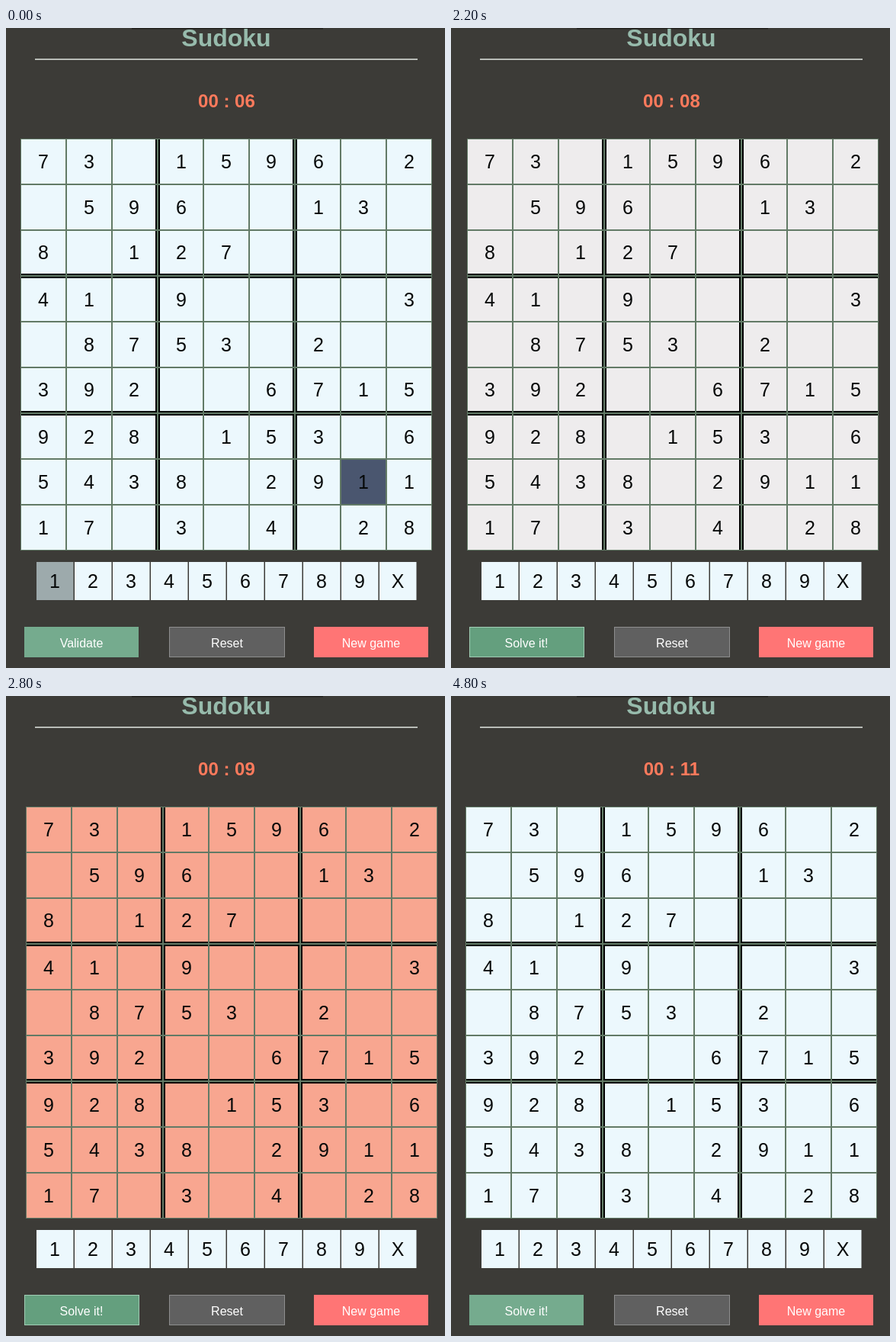
Write an HTML page that moves like this. It is 576 by 839 pixels and loops after 5.1 s.

```html
<!DOCTYPE html>
<html lang="en">
<head>
<meta charset="utf-8">
<title>Sudoku</title>
<style>
  html, body { margin: 0; width: 100%; height: 100%; overflow: hidden; background: #3c3b37; }
  svg { display: block; width: 576px; height: 839px; font-family: "Liberation Sans", Arial, sans-serif; }
  text { text-anchor: middle; }
  .digit { font-size: 25px; fill: #060808; }
  .label { font-size: 16px; fill: #fff; }
  .title { font-size: 32px; font-weight: bold; fill: #97bbac; }
  .timer { font-size: 24px; font-weight: bold; fill: #ff7a5c; }
</style>
</head>
<body>
<svg id="stage" viewBox="0 0 576 839"></svg>
<script>
const LOOP = 5100, STEP = 100;
const PALE = [236, 248, 253], CORAL = [255, 123, 87], GREY = [157, 170, 172];
const GREEN = [117, 171, 142], GREEN_HOVER = [100, 159, 126], GREEN_EDGE = [160, 204, 180];
const ROWS = ['73.1596.2', '.596..13.', '8.127....', '41.9....3', '.8753.2..',
              '392..6715', '928.153.6', '5438.2911', '17.3.4.28'];
const SHAKE_START = 2100;
const SHAKE = [-10, 2, -2, 2, -3, 4, -5, 7, -5, 3, 8, 0];

const stage = document.getElementById('stage');

function add(parent, tag, attrs, content) {
  const el = document.createElementNS('http://www.w3.org/2000/svg', tag);
  for (const name in attrs) el.setAttribute(name, attrs[name]);
  if (content) el.textContent = content;
  return parent.appendChild(el);
}
function rect(parent, x, y, width, height, fill) {
  return add(parent, 'rect', fill ? { x, y, width, height, fill } : { x, y, width, height });
}
function text(parent, cls, x, y, content) {
  return add(parent, 'text', { class: cls, x, y }, content);
}

const clamp = v => Math.min(1, Math.max(0, v));
const ramp = (t, from, to) => clamp((t - from) / (to - from));
const swing = p => 0.5 - Math.cos(p * Math.PI) / 2;
const mix = (a, b, p) => `rgb(${a.map((v, i) => Math.round(v + (b[i] - v) * p))})`;

// Header
rect(stage, 165, 0, 251, 1.4, '#20201d');
text(stage, 'title', 289, 24, 'Sudoku');
rect(stage, 38, 40.3, 502, 1.5, '#e2e6e2');
const timer = text(stage, 'timer', 289.4, 104, '00 : 06');

// Board: frame, dark block edges, cell faces, digits
const board = add(stage, 'g', {});
rect(board, 19, 145, 540, 540, '#627a66');
const edges = add(board, 'g', { fill: '#000' });
const faces = add(board, 'g', {});
const digits = add(board, 'g', {});
let picked;

function span(i) {
  const before = i % 3 === 0 && i > 0 ? 2 : 0;
  const after = i % 3 === 2 && i < 8 ? 2 : 0;
  return { pos: i * 60 + 1 + before, size: 58 - before - after };
}
ROWS.forEach((row, r) => [...row].forEach((ch, c) => {
  const h = span(c), v = span(r);
  const x = 19 + h.pos, y = 145 + v.pos;
  rect(edges, 20 + c * 60, 146 + r * 60, 58, 58);
  const face = rect(faces, x, y, h.size, v.size);
  if (r === 7 && c === 7) picked = face;
  if (ch !== '.') text(digits, 'digit', x + h.size / 2, y + v.size / 2 + 9, ch);
}));

// Keypad
const keys = [...'123456789X'].map((ch, i) => {
  const key = rect(stage, 40 + i * 50, 700, 48.5, 50, mix(PALE, PALE, 0));
  text(stage, 'digit', 64 + i * 50, 734, ch);
  return key;
});

// Buttons
function button(x, width, fill, edge, label) {
  const box = add(stage, 'rect', { x: x + 0.5, y: 785.5, width: width - 1, height: 39, fill, stroke: edge });
  return { box, label: text(stage, 'label', x + width / 2, 812, label) };
}
const check = button(24, 150, '#75ab8e', '#75ab8e', 'Validate');
button(214, 152, '#606060', '#8e8e8e', 'Reset');
button(404, 150, '#ff7575', '#ff7575', 'New game');

function draw(t) {
  const seconds = t < 900 ? 6 : 7 + Math.floor((t - 800) / 1000);
  timer.textContent = '00 : ' + String(seconds).padStart(2, '0');

  keys[0].setAttribute('fill', mix(GREY, PALE, swing(ramp(t, 200, 800))));

  const hover = swing(ramp(t, 800, 1300)) - swing(ramp(t, 3500, 4000));
  check.box.setAttribute('fill', mix(GREEN, GREEN_HOVER, hover));
  check.box.setAttribute('stroke', mix(GREEN, GREEN_EDGE, hover));
  check.box.setAttribute('width', 149 + hover);
  check.label.textContent = t < SHAKE_START ? 'Validate' : 'Solve it!';

  const alarm = swing(ramp(t, 2100, 2600)) - swing(ramp(t, 2600, 3100));
  faces.setAttribute('fill', mix(PALE, CORAL, alarm));
  if (t < SHAKE_START) picked.setAttribute('fill', '#4a566f');
  else picked.removeAttribute('fill');

  const shift = SHAKE[(t - SHAKE_START) / STEP] || 0;
  board.setAttribute('transform', `translate(${shift} 0)`);
}

const begin = performance.now();
function tick() {
  const t = (performance.now() - begin) % LOOP;
  draw(Math.floor(t / STEP) * STEP);
  requestAnimationFrame(tick);
}
tick();
</script>
</body>
</html>
```
